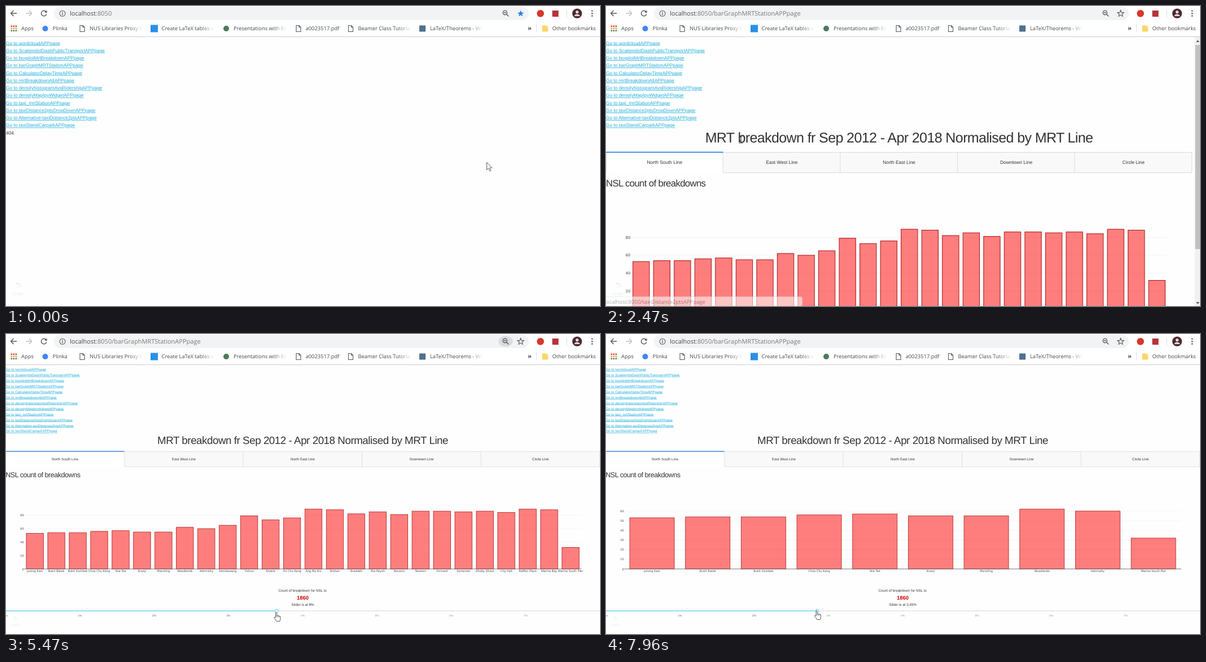
An HTML page that plays this animation: 1052x532 px, repeating every 8000 ms.

```html
<!DOCTYPE html>
<html lang="en">
<head>
<meta charset="utf-8">
<title>Breakdown dashboard</title>
<style>
  html, body { margin: 0; width: 100%; height: 100%; overflow: hidden; background: #fefefe; }
  svg { display: block; width: 1052px; height: 532px; }
  text { white-space: pre; text-rendering: geometricPrecision; }
  .page text { font-family: "Liberation Sans", Arial, sans-serif; fill: #323232; }
  .page .plot { font-family: "DejaVu Sans", Verdana, sans-serif; fill: #444; }
  .page .link { fill: #1eaedb; text-decoration: underline; }
  .page .mark { fill: #666; }
  .page .off { fill: #999; }
  .page .total { fill: #d00000; font-weight: bold; }
  .ui text { font-family: "Open Sans", "Noto Sans", sans-serif; fill: #45484c; }
  .ui .status { fill: #6a6d70; }
  .line { fill: none; stroke: #55585c; stroke-width: 1.4; }
</style>
</head>
<body>
<svg id="stage" viewBox="0 0 1052 532"></svg>
<script>
const stage = document.getElementById('stage');
const LOOP = 8000, TOTAL = 1860, TOP = 54.5;

const links = ['wordcloud', 'ScatterplotDashPublicTransport', 'boxplotMrtBreakdown', 'barGraphMRTStation',
  'CalculatorDelayTime', 'mrtBreakdownAll', 'densityhistogramAvgRidership', 'densityMapIpyWidget',
  'taxi_mrtStation', 'taxiDistance2ptsDropDown', 'Alternative-taxiDistance2pts', 'taxiStandCarpark'];
const tabs = ['North South', 'East West', 'North East', 'Downtown', 'Circle'];
const stations = ('Jurong East:53,Bukit Batok:54,Bukit Gombak:54,Choa Chu Kang:56,Yew Tee:57,Kranji:55,Marsiling:55,' +
  'Woodlands:62,Admiralty:60,Sembawang:65,Yishun:79,Khatib:73,Yio Chu Kang:76,Ang Mo Kio:89,Bishan:88,Braddell:82,' +
  'Toa Payoh:85,Novena:81,Newton:86,Orchard:86,Somerset:85,Dhoby Ghaut:86,City Hall:84,Raffles Place:89,' +
  'Marina Bay:88,Marina South Pier:32').split(',').map(s => {
    const [name, count] = s.split(':');
    return { name, count: +count };
  });

// Each step overrides part of the state before it.
const steps = [
  [0, { view: 'index', zoom: 1, width: 1052, scroll: 0, path: '', limit: 8, handle: 8, cursor: ['arrow', 851.5, 277.5] }],
  [500, { cursor: ['arrow', 265.5, 83.5] }],
  [1000, { cursor: ['hand', 75.5, 104] }],
  [1470, { view: 'loading', path: '/barGraphMRTStationAPPpage', status: 'barGraphMRTStationAPPpage', statusAlpha: 1 }],
  [1970, { view: 'chart', width: 1038 }],
  [2470, { status: 'taxiDistance2ptsAPPpage', statusAlpha: .55, cursor: ['beam', 239, 237] }],
  [2970, { scroll: 119, status: '', cursor: ['hand', 518, 167.5] }],
  [3490, { cursor: ['arrow', 542.5, 188.5] }],
  [3990, { zoom: .75, width: 1403.6, scroll: 0, popup: true, lens: true, cursor: ['beam', 571, 198] }],
  [4470, { hover: true, cursor: ['cross', 506, 385] }],
  [4970, { hover: false, cursor: ['hand', 477.5, 490] }],
  [5470, { handle: 3.65, focus: true, popup: false, cursor: ['hand', 474, 493] }],
  [5990, { limit: 3.65, lens: false, cursor: ['arrow', 459.5, 491.5] }],
  [6480, { cursor: ['hand', 456, 490.5] }],
  [7000, { limit: 3.45, handle: 3.45, cursor: ['hand', 447.5, 489.5] }],
  [7490, { cursor: ['hand', 374.5, 489.5] }],
  [7960, { handle: 2.85, cursor: ['hand', 368.5, 490] }]
];

const text = (x, y, str, size, attrs = '') => `<text x="${x}" y="${y}" font-size="${size}" ${attrs}>${str}</text>`;
const mid = (x, y, str, size, attrs = '') => text(x, y, str, size, 'text-anchor="middle" ' + attrs);
const rect = (x, y, w, h, fill, attrs = '') => `<rect x="${x}" y="${y}" width="${w}" height="${h}" fill="${fill}" ${attrs}/>`;
const circle = (x, y, r, fill, attrs = '') => `<circle cx="${x}" cy="${y}" r="${r}" fill="${fill}" ${attrs}/>`;
const path = (d, attrs = 'class="line"') => `<path d="${d}" ${attrs}/>`;
const each = (n, fn) => Array.from({ length: n }, (_, i) => fn(i)).join('');

function tabRow(width) {
  const w = width / 5;
  return each(5, i => rect(i * w, 204.8, w, 36.4, i ? '#f9f9f9' : '#fff')
      + mid((i + .5) * w, 225.8, tabs[i] + ' Line', 8.33))
    + path(`M0 205H${width}M${w} 241.2H${width}` + each(5, i => `M${(i + 1) * w - .4} 205V241`) + 'M.4 205V241',
      'fill="none" stroke="#d6d6d6" stroke-width=".9"')
    + rect(0, 204, w, 1.7, '#2a7de1');
}

function slider(s, y) {
  const step = s.width / 8, end = s.handle * step;
  const blue = '#8ad6f9';
  return rect(0, y - 1.1, s.width, 2.2, '#e6e6e6') + rect(0, y - 1.1, end, 2.2, blue)
    + each(8, i => {
      const on = i <= s.handle;
      return circle(i * step, y, 1.8, '#fff', `stroke="${on ? blue : '#e0e0e0'}" stroke-width="1.1"`)
        + mid(i * step, y + 13, i + '%', 6.67, `class="mark ${on ? '' : 'off'}"`);
    })
    + (s.focus ? circle(end, y, 4.6, '#c5ebfc') : '')
    + circle(end, y, 3.6, '#fff', `stroke="${s.focus ? '#62c4f2' : blue}" stroke-width="1.3"`);
}

function chart(s) {
  const base = 483, left = 44, right = s.width - 44;
  const shown = stations.filter(d => d.count / TOTAL * 100 <= s.limit);
  const max = Math.max(...shown.map(d => d.count));
  const unit = 141.6 / max, pitch = (right - left) / shown.length;
  const tick = max > 70 ? 20 : 10, tilted = s.zoom === 1;
  const grid = each(Math.floor(max / tick) + 1, i => {
    const y = base - i * tick * unit;
    return rect(left, y - .4, right - left, .8, '#eee') + text(left - .8, y + 2.4, i * tick, 6.67, 'class="plot" text-anchor="end"');
  });
  const bars = shown.map((d, i) => {
    const x = left + (i + .5) * pitch, h = d.count * unit;
    return rect(x - pitch * .4, base - h, pitch * .8, h, 'rgba(255,0,0,.5)', 'stroke="#b01c1c" stroke-width="1.1"')
      + (tilted ? text(0, 0, d.name, 6.67, `class="plot" transform="translate(${x - 2} 491) rotate(30)"`)
        : mid(x, 490.6, d.name, 6.67, 'class="plot"'));
  }).join('');
  const c = s.width / 2;
  return text(0, 265.5, 'NSL count of breakdowns', 16.67, 'letter-spacing="-.6"')
    + grid + bars + rect(left, base - .5, right - left, 1, '#555')
    + mid(c, 537, 'Count of breakdown for NSL is:', 8.33)
    + mid(c, 555.3, TOTAL, 12.6, 'class="total"')
    + mid(c, 570.6, `Slider is at ${s.limit}%`, 8.33)
    + slider(s, 582);
}

function page(s) {
  let body = links.map((name, i) => text(0, 14 + i * 13.27, `Go to ${name}APPpage`, 8.33, 'class="link"')).join('');
  if (s.view === 'index') body += text(0, 173, '404', 8.33);
  else {
    body += mid(s.width / 2, 187.5, 'MRT breakdown fr Sep 2012 - Apr 2018 Normalised by MRT Line', 25, 'letter-spacing="-.6"')
      + tabRow(s.width) + (s.view === 'chart' ? chart(s) : slider(s, 244.5));
  }
  const shift = s.zoom < 1 ? -.8 : 0;
  const undo = path('M18.5-39.5H23A2.5 2.5 0 0 1 23-34H19.5M20.5-41.5L18.3-39.5L20.5-37.5', 'fill="none" stroke="#d5edf9"')
    + mid(21.3, -19.3, 'undo', 8.33, 'style="fill:#d9effa"');
  return `<g class="page"><g transform="translate(${shift} ${TOP - s.scroll}) scale(${s.zoom})">${body}</g>
    <g transform="translate(0 532) scale(${s.zoom})">${undo}</g></g>`;
}

function scrollbar(s) {
  if (s.view !== 'chart' || s.zoom < 1) return '';
  return rect(1042.5, 55, 9.5, 477, '#f1f1f1') + rect(1043.5, s.scroll ? 158 : 69, 8.5, 362, '#c1c1c1')
    + path('M1045 64L1048 60.5L1051 64ZM1045 525L1048 528.5L1051 525Z', 'fill="#555"');
}

// Graph toolbar, value label and axis label under the pointer.
function hoverLabels() {
  return each(10, i => rect(955 + i * 9.6, 266, 5.5, 5.5, '#ccc', 'rx="1"'))
    + `<g class="page">` + path('M523 326L527 323V321H539V331H527V329Z', 'fill="#ff8080" stroke="#444" stroke-width=".5"')
    + mid(533, 328, '76', 5.4, 'class="plot"')
    + path('M485.5 419.5H505.5L507.5 417L509.5 419.5H529V428H485.5Z', 'fill="#444"')
    + mid(507.3, 425.7, 'Yio Chu Kang', 5.4, 'class="plot" style="fill:#fff"') + '</g>';
}

function bookmark(x, label, icon, fades = true) {
  return icon + text(x, 43.3, label, 9.4)
    + (fades ? rect(x + 70, 30, 24, 20, 'url(#fade)') + rect(x + 94, 30, 14, 20, '#fff') : '');
}
const sheet = x => path(`M${x} 34.5H${x + 5}L${x + 8} 37.5V45.5H${x}ZM${x + 5} 34.5V37.5H${x + 8}`, 'class="line" style="stroke-width:1.1"');

function toolbar(s) {
  const dots = ['#e34133', '#f2a33a', '#4a8a4e'];
  const star = each(10, i => {
    const a = i * Math.PI / 5, r = i % 2 ? 2.6 : 6;
    return `${i ? 'L' : 'M'}${911.5 + r * Math.sin(a)} ${13.5 - r * Math.cos(a)}`;
  }) + 'Z';
  return '<g class="ui">' + rect(0, 0, 1052, 54, '#fff') + rect(0, 54, 1052, 1, '#c9cbcd')
    + path('M19 13H9M13.5 8L8.5 13L13.5 18')
    + path('M35 13H45M40.5 8L45.5 13L40.5 18', 'class="line" style="stroke:#bcbec1"')
    + path('M71 10A4.8 4.8 0 1 0 71.8 14.5') + path('M72.5 7.5V12H68Z', 'fill="#55585c"')
    + rect(85, 1.5, 841, 23.5, '#f1f3f4', 'rx="11.75"')
    + circle(100, 13.3, 5, 'none', 'stroke="#55585c" stroke-width="1.1"') + path('M100 12.5V16.2M100 10.2V11.4')
    + text(113, 17.3, 'localhost<tspan fill="#777a7e">:8050' + s.path + '</tspan>', 11)
    + (s.lens ? `<ellipse cx="885" cy="13" rx="12.5" ry="9.5" fill="#d9dbde"/>` : '')
    + circle(883.7, 11.8, 3.7, 'none', 'stroke="#55585c" stroke-width="1.3"') + path('M886.5 14.6L890.3 18.4M881.8 11.8H885.6')
    + path(star, s.path ? 'class="line" style="stroke-width:1.1"' : 'fill="#2b7de9"')
    + circle(946.5, 13.3, 6.3, '#d8372b') + rect(967.5, 8, 11, 11, '#b8323c')
    + rect(992.5, 7, 1, 13, '#dcdee0')
    + circle(1011.5, 13.2, 8.6, '#4b2a30') + circle(1011.5, 10.7, 2.6, '#e8d5d5')
    + path('M1006.5 18Q1007 14.5 1011.5 14.5T1016.5 18Z', 'fill="#e8d5d5"')
    + each(3, i => circle(1038, 8.8 + i * 4.4, 1.3, '#55585c'))
    + each(9, i => rect(8.5 + i % 3 * 4, 34.5 + Math.floor(i / 3) * 4, 2.6, 2.6, dots[Math.floor(i / 3)]))
    + text(27, 43.3, 'Apps', 9.4)
    + bookmark(82.5, 'Plinka', circle(69.5, 40, 5, '#4285f4'), false)
    + bookmark(148, 'NUS Libraries Proxy E', sheet(131))
    + bookmark(275.5, 'Create LaTeX tables o', rect(256, 33.5, 13, 13, '#2b8fe8'))
    + bookmark(403, 'Presentations with Be', circle(390, 40, 5, '#4b7a58'))
    + bookmark(530.5, 'a0023517.pdf', sheet(514), false)
    + bookmark(623.5, 'Beamer Class Tutoria', sheet(606.5))
    + bookmark(751, 'LaTeX/Theorems - Wi', rect(732, 34.5, 11, 11, '#4f6f8f'))
    + text(924, 43, '»', 11, 'font-weight="bold"') + rect(939, 33, 1, 14, '#dcdee0')
    + path('M949.5 34.5H957L960 37V45.5H949.5Z', 'fill="#fbd769"')
    + text(967.5, 43.3, 'Other bookmarks', 9.4) + '</g>';
}

const zoomPopup = () => '<g class="ui">' + rect(686.5, 22.5, 211.5, 38.5, '#fff', 'rx="2" filter="url(#shadow)"')
  + text(699.5, 45, '50%', 9.6) + path('M779.5 41.5H790M805.5 41.5H816.5M811 36V47')
  + rect(831.5, 28.5, 52, 26, '#fff', 'rx="3" stroke="#d6d8db"') + mid(857.3, 44.7, 'Reset', 9.6) + '</g>';

const statusBar = s => `<g class="ui" opacity="${s.statusAlpha}">`
  + path('M-1 533V515.5H344Q347.5 515.5 347.5 519V533Z', 'fill="#fff" stroke="#dcdcdc"')
  + text(-2.4, 528, 'localhost:8050/' + s.status, 9.42, 'class="status"') + '</g>';

const cursors = {
  arrow: 'M0 0V13L3 10.2L5.3 15.3L7.4 14.4L5.2 9.4H9.2Z',
  hand: 'M3.5 10V1.8Q3.5.5 4.6.5T5.7 1.8V6.2Q7.6 5.4 8 6.7Q9.8 6 10.2 7.4Q12 7 12 8.7V12Q11.8 14 10.8 16.5H5Q4.2 14 1 10.7Q.5 9 2 9Z',
  beam: 'M-3-6H-1L0-5L1-6H3M0-5V5M-3 6H-1L0 5L1 6H3',
  cross: 'M-6 0H6M0-6V6'
};
function pointer([kind, x, y]) {
  const solid = kind === 'arrow' || kind === 'hand';
  return path(cursors[kind], `transform="translate(${x} ${y})" fill="${solid ? '#fff' : 'none'}" stroke="#333" stroke-width="${solid ? .8 : 1.2}"`)
    + (kind === 'hand' ? path('M5.7 6V9M8 6.7V9.3M10.2 7.4V9.6', `transform="translate(${x} ${y})" stroke="#333" stroke-width=".7"`) : '');
}

const defs = `<defs>
  <linearGradient id="fade"><stop stop-color="#fff" stop-opacity="0"/><stop offset="1" stop-color="#fff"/></linearGradient>
  <filter id="shadow" x="-10%" y="-30%" width="120%" height="170%"><feDropShadow dx="0" dy="1" stdDeviation="1.6" flood-opacity=".4"/></filter>
</defs>`;

function draw(s) {
  stage.innerHTML = defs + page(s) + (s.hover ? hoverLabels() : '') + scrollbar(s) + toolbar(s)
    + (s.popup ? zoomPopup() : '') + (s.status ? statusBar(s) : '') + pointer(s.cursor);
}

let current = -1;
function frame() {
  const time = performance.now() % LOOP;
  const index = steps.filter(([start]) => start <= time).length - 1;
  if (index !== current) {
    current = index;
    draw(Object.assign({}, ...steps.slice(0, index + 1).map(step => step[1])));
  }
  requestAnimationFrame(frame);
}
frame();
</script>
</body>
</html>
```
